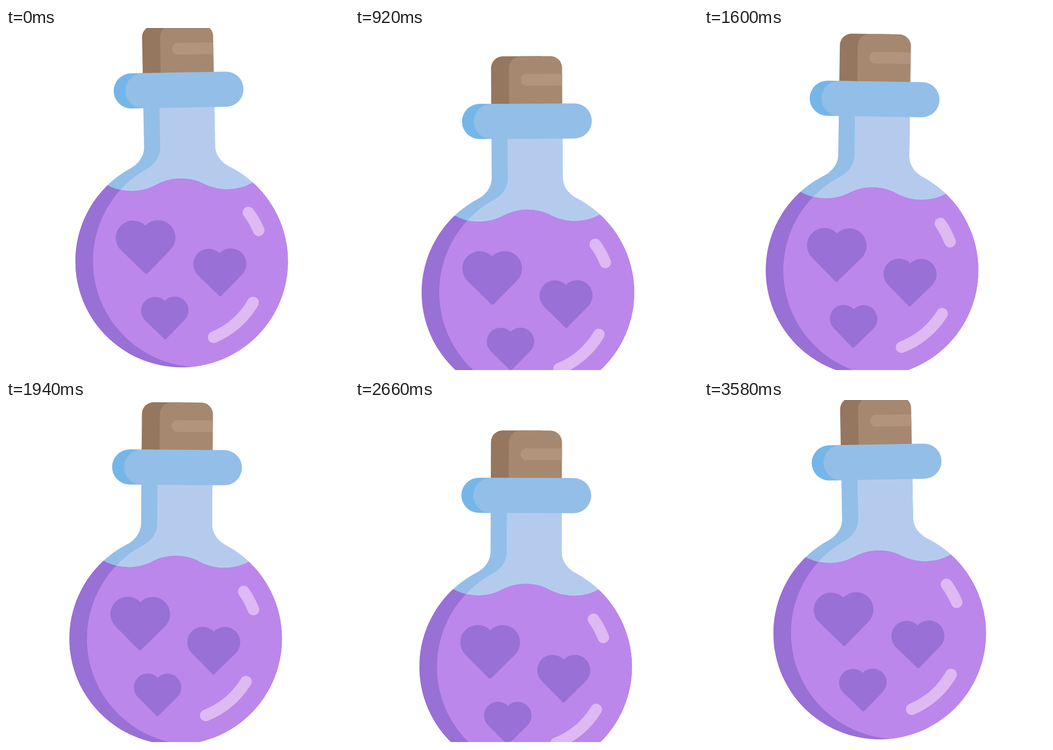
An HTML page that plays this animation: 700x704 px, repeating every 3.6 s.

```html
<!DOCTYPE html>
<html lang="en">
<head>
<meta charset="utf-8">
<title>Floating potion</title>
<style>
  html, body { margin: 0; width: 100%; height: 100%; overflow: hidden; background: #fff; }
  svg { display: block; width: 700px; height: 700px; overflow: hidden; }
</style>
</head>
<body>
<svg viewBox="0 0 700 700">
  <defs>
    <clipPath id="glass">
      <path d="M277.5 160V278C277.5 297 265 313 248 321.5A217 217 0 1 0 452 321.5C435 313 422.5 297 422.5 278V160Z"/>
    </clipPath>
    <clipPath id="lit">
      <path d="M310.5 160V278C310.5 297 300 312 284 321.5A217 217 0 1 0 488 321.5V160Z"/>
    </clipPath>
    <path id="liquid" d="M120 354.5H201.5C217 363.5 235 367.5 253 367.5C270 367.5 287 363 301 355.5C316 347.5 333 343.5 350 343.5C367 343.5 384 347.5 398 355.5C413 363 430 367.5 447 367.5C465 367.5 483 363 498.5 354.5H580V740H120Z"/>
    <path id="heart" d="M0 10.4A35.5 35.5 0 1 0 -50.2 60.6L-2 108.8Q0 110.2 2 108.8L50.2 60.6A35.5 35.5 0 1 0 0 10.4Z"/>
  </defs>
  <g id="bottle">
    <g clip-path="url(#glass)">
      <path fill="#93bee7" d="M120 150H580V400H120Z"/>
      <path fill="#b5cbee" d="M120 150H580V400H120Z" clip-path="url(#lit)"/>
      <use href="#liquid" fill="#9970d6"/>
      <g clip-path="url(#lit)"><use href="#liquid" fill="#bb87eb"/></g>
    </g>
    <g fill="#9970d6">
      <use href="#heart" transform="translate(277.4 428.3)"/>
      <use href="#heart" transform="translate(427.8 488.7) scale(.888)"/>
      <use href="#heart" transform="translate(313.9 585.1) scale(.795)"/>
    </g>
    <g fill="none" stroke="#deb9f2" stroke-width="23.6" stroke-linecap="round">
      <path d="M488.1 415.4A169 169 0 0 1 508.3 452.4"/>
      <path d="M494.3 599.9A169 169 0 0 1 412.6 669.6"/>
    </g>
    <path fill="#95765f" d="M277.5 130V53.5A24 24 0 0 1 301.5 29.5H380V130Z"/>
    <path fill="#a5886f" d="M314 130V53.5A24 24 0 0 1 338 29.5H398.5A24 24 0 0 1 422.5 53.5V130Z"/>
    <path fill="#b2937e" d="M422.5 66H350A12 12 0 0 0 350 90H422.5Z"/>
    <rect fill="#75b6e9" x="217.5" y="126.5" width="120" height="72" rx="36"/>
    <rect fill="#93bee7" x="241.7" y="126.5" width="240.8" height="72" rx="36"/>
  </g>
</svg>
<script>
  const LOOP = 3600, ARM = 474, REST = 29.5;
  // [time, value]: sideways drift of the body, and height of the cork
  const sway = [[0, 8.4], [520, -8.7], [1180, 8.7], [1705, -8.7], [2370, 8.7], [2885, -8.7], [3550, 8.6], [LOOP, 8.4]];
  const lift = [[0, -6], [780, 60], [1875, 4], [2755, 64], [3590, -6], [LOOP, -6]];
  const bottle = document.getElementById('bottle');

  function at(keys, t) {
    const i = keys.findIndex(k => k[0] > t);
    const [t0, a] = keys[i - 1], [t1, b] = keys[i];
    return a + (b - a) * (1 - Math.cos(Math.PI * (t - t0) / (t1 - t0))) / 2;
  }

  function draw() {
    const t = performance.now() % LOOP;
    const angle = -Math.asin(at(sway, t) / ARM) * 180 / Math.PI;
    bottle.setAttribute('transform', `translate(0 ${at(lift, t) - REST}) rotate(${angle} 350 39)`);
    requestAnimationFrame(draw);
  }
  draw();
</script>
</body>
</html>
```
